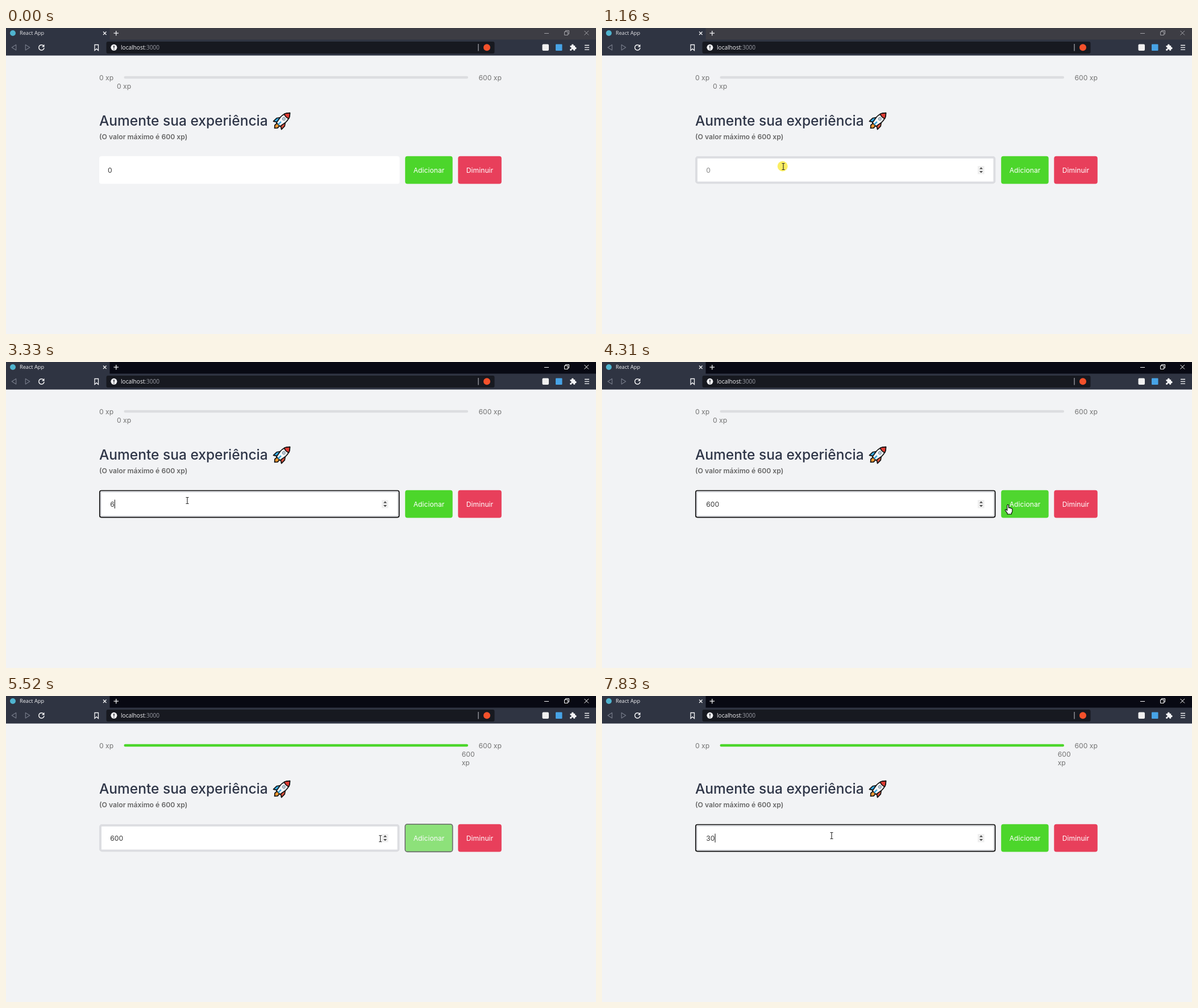
Recreate the animation shown at these times as an HTML page. Size 1038 px wide and 539 px high, loop 8000 ms.

```html
<!DOCTYPE html>
<html lang="pt-BR">
<head>
<meta charset="utf-8">
<title>React App</title>
<style>
  html, body { margin: 0; width: 100%; height: 100%; overflow: hidden; background: #f2f3f5; }
  svg { display: block; width: 100vw; height: 100vh; }
  text { font: 12.2px Inter, sans-serif; white-space: pre; }
  .ui { font-family: "Open Sans", "Noto Sans", sans-serif; }
  .muted { fill: #737373; }
  .line { fill: none; stroke: #f4f4f6; stroke-width: 1.3; }
</style>
</head>
<body>
<svg viewBox="0 0 1038 539">
  <rect width="1038" height="539" fill="#f2f3f5"/>

  <!-- browser frame -->
  <rect id="titleBar" width="1038" height="21"/>
  <path d="M0 0H182.500V20.500H1038V48.500H0Z" fill="#2f3442"/>
  <circle cx="12" cy="9" r="5" fill="#4fb4cf"/>
  <text id="tabTitle" class="ui" x="24" y="12.300" style="font-size:9.2px;font-weight:500">React App</text>
  <path class="line" d="M171 6.500l5.500 5.500m0-5.500l-5.500 5.500"/>
  <path class="line" d="M189.500 9.200h8.500m-4.250-4.250v8.500"/>
  <g id="windowButtons" fill="none" stroke-width="1">
    <path d="M947 9.500h8"/>
    <path d="M982.500 6.500h6v6h-6zM984.500 6.500v-2h6v6h-2"/>
    <path d="M1017.500 5l7.500 7.500m0-7.500l-7.500 7.500"/>
  </g>
  <g fill="none" stroke="#747987" stroke-width="1.200" stroke-linejoin="round">
    <path d="M17.700 29.500v9.500l-7.500-4.750z"/>
    <path d="M34.300 29.500v9.500l7.500-4.750z"/>
  </g>
  <path class="line" stroke-linecap="round" style="stroke-width:1.500" d="M66 31.300A4.700 4.700 0 1 0 67 35.500"/>
  <path d="M67.500 28.800v4.700h-4.700z" fill="#f4f4f6"/>
  <path class="line" d="M156 29.500h6.500v10l-3.250-2.800l-3.250 2.800z"/>
  <rect x="176.500" y="24" width="683" height="21" rx="3" fill="#171920"/>
  <circle cx="189.900" cy="34.300" r="5.500" fill="#f4f4f6"/>
  <path d="M189.900 31v4.200m0 1.200v1.400" stroke="#171920" stroke-width="1.500"/>
  <text class="ui" x="202" y="38" fill="#f4f4f6" style="font-size:10.1px">localhost<tspan fill="#9b9da5">:3000</tspan></text>
  <path d="M831 28v12.500" stroke="#c9cad0"/>
  <circle cx="846" cy="34.200" r="6" fill="#f4512b"/>
  <rect x="943.500" y="28.500" width="11.500" height="11.500" rx="2" fill="#f1f1f1"/>
  <rect x="967" y="28.500" width="11.500" height="11.500" rx="1" fill="#47a3e6"/>
  <path d="M992.500 31h2.500a1.900 1.900 0 1 1 3.600 0h2.500v2.700a1.900 1.900 0 1 1 0 3.600v2.400h-2.800a1.700 1.700 0 1 0-3.200 0h-2.900v-2.900a1.700 1.700 0 1 0 .300-3.200z" fill="#f4f4f6"/>
  <path class="line" d="M1018 30.500h8m-8 3.800h8m-8 3.800h8"/>

  <!-- progress -->
  <text class="muted" x="164" y="91.500">0 xp</text>
  <text class="muted" x="831.500" y="91.500">600 xp</text>
  <rect id="track" x="207.500" y="84.700" width="605.500" height="4.600" rx="2.300"/>
  <text id="emptyLabel" class="muted" x="207.500" y="107" text-anchor="middle">0 xp</text>
  <text id="fullLabel" class="muted" y="107"><tspan x="801.700">600</tspan><tspan x="801.700" dy="15.300">xp</tspan></text>

  <!-- heading -->
  <text x="164" y="171.500" fill="#2e3547" style="font-size:24.5px;font-weight:500">Aumente sua experiência</text>
  <text x="164" y="196" fill="#666" style="font-weight:600">(O valor máximo é 600 xp)</text>
  <g transform="translate(486 163) rotate(45)" stroke="#111" stroke-width="1.700" stroke-linejoin="round">
    <path d="M-3 9L-3.500 15L0 19L3.500 15L3 9Z" fill="#f59b35"/>
    <path d="M-5-3L-10 4V12L-4 8Z" fill="#35a9e1"/>
    <path d="M5-3L10 4V12L4 8Z" fill="#e2533f"/>
    <path d="M0-19C5-14 7-9 6.500-2L4.500 10H-4.500L-6.500-2C-7-9-5-14 0-19Z" fill="#f4f6f8"/>
    <path d="M0-19C3-16 5-13.500 5.800-10.500Q0-8-5.800-10.500C-5-13.500-3-16 0-19Z" fill="#df3c34"/>
    <circle cy="-4" r="2.400" fill="#c3d4df" stroke="#7a8d9b" stroke-width="1"/>
    <path d="M0 3V10" stroke="#35a9e1" stroke-width="2.500"/>
  </g>

  <!-- form -->
  <rect x="164" y="225.700" width="528.500" height="48.700" rx="4" fill="#fff"/>
  <g id="fieldBorder">
    <rect x="166" y="227.700" width="524.500" height="44.700" rx="2.500" fill="none" stroke="#dcdde1" stroke-width="4"/>
    <rect x="661" y="243" width="11.500" height="14.500" fill="#efefef"/>
    <path d="M664 248.500l3-3.300l3 3.300zM664 252l3 3.300l3-3.300z" fill="#484848"/>
  </g>
  <rect id="fieldRing" x="164.800" y="226.500" width="526.900" height="47.100" rx="3" fill="none" stroke="#101010" stroke-width="1.700"/>
  <rect id="selection" x="183.300" y="242" height="16" fill="#2f8ff5"/>
  <text id="value" y="254.500"></text>
  <rect id="caret" y="242.500" width="1" height="15.500" fill="#111"/>
  <g id="addButton">
    <rect x="702.200" y="225.700" width="83.500" height="48.700" rx="4" fill="#4cd62b"/>
    <text x="744" y="254.500" text-anchor="middle" fill="#fff">Adicionar</text>
    <rect id="addRing" x="702.200" y="225.700" width="83.500" height="48.700" rx="4" fill="none" stroke="#101010" stroke-width="1.600"/>
  </g>
  <rect x="795.300" y="225.700" width="76.500" height="48.700" rx="4" fill="#e83f5b"/>
  <text x="833.500" y="254.500" text-anchor="middle" fill="#fff">Diminuir</text>

  <!-- pointer -->
  <g id="pointer">
    <circle id="press" cx="-1.300" cy="-.500" r="9" fill="#fbee62"/>
    <path id="arrow" d="M0 0V16L3.700 12.600L6.100 18.300L8.500 17.300L6.100 11.700H11.300Z" fill="#fff" stroke="#000" stroke-width=".9"/>
    <path id="beam" d="M-2.500-5.500H-.700L0-5L.700-5.500H2.500M0-5V5M-2.500 5.500H-.700L0 5L.700 5.500H2.500" fill="none" stroke="#222" stroke-width="1.100"/>
    <path id="hand" d="M-1.300 1.200Q0-.700 1.300 1.200V6Q2.800 4.900 3.800 6.400Q5.200 5.500 6 7Q7.700 6.500 7.700 8.300V12Q7.500 14 6.200 15V17H-1V15.300L-4.700 10.500Q-5.200 8.700-3.500 8.700L-1.300 10.500Z" fill="#fff" stroke="#000" stroke-width="1.100" stroke-linejoin="round"/>
  </g>
</svg>
<script>
const LOOP = 8000;
const ui = Object.fromEntries([...document.querySelectorAll("[id]")].map(el => [el.id, el]));

const smooth = u => u * u * (3 - 2 * u);
const linear = u => u;
const easeOut = u => 1 - (1 - u) ** 2;
const clamp = u => Math.max(0, Math.min(1, u));
const within = (t, ranges) => ranges.some(([a, b]) => t >= a && t < b);
const show = (el, on) => el.setAttribute("visibility", on ? "visible" : "hidden");
const set = (el, attrs) => { for (const k in attrs) el.setAttribute(k, attrs[k]); };

// time, x, y, easing towards this point
const path = [
  [320, 845, 510],
  [1110, 319, 244, smooth],
  [3980, 319, 244, linear],
  [4080, 410, 221, linear],
  [4180, 548, 208, linear],
  [4260, 655, 224, linear],
  [4310, 714, 251, linear],
  [4670, 744, 253, easeOut],
  [5370, 744, 253, linear],
  [5830, 406, 246, smooth]
];
const presses = [[1160, 1330], [1760, 1860], [4900, 4990], [6060, 6160], [6490, 6520]];
const selections = [[1790, 3330], [6490, 7730]];
const values = [[0, "0"], [3330, "6"], [3430, "60"], [3710, "600"], [7730, "3"], [7830, "30"]];
const carets = [[1220, 1790], [3330, 4210], [4790, 4900], [6060, 6490], [7730, LOOP]];
const fieldFocus = [[1220, 4900], [6060, LOOP]];

function pointerAt(t) {
  if (t >= 6720) return [404, 246];
  const i = path.findIndex(p => p[0] > t);
  if (i < 0) return path.at(-1).slice(1, 3);
  if (i === 0) return [-50, -50];
  const [t0, x0, y0] = path[i - 1], [t1, x1, y1, ease] = path[i];
  const u = ease((t - t0) / (t1 - t0));
  return [x0 + (x1 - x0) * u, y0 + (y1 - y0) * u];
}

function render(t) {
  const [x, y] = pointerAt(t);
  const inRow = y > 225.7 && y < 274.4;
  const overField = inRow && x > 164 && x < 692.5;
  const overAdd = inRow && x > 702.2 && x < 785.7;
  const focused = within(t, fieldFocus);
  const selected = within(t, selections);
  const bordered = focused || overField;
  const full = t >= 5000;
  const active = t >= 1220;

  set(ui.titleBar, { fill: active ? "#080913" : "#3d3d44" });
  set(ui.tabTitle, { fill: active ? "#f4f4f6" : "#e4e4e8" });
  set(ui.windowButtons, { stroke: active ? "#fff" : "#a3a3a8" });

  set(ui.track, { fill: full ? "#4cd62b" : "#dcdde0" });
  show(ui.emptyLabel, !full);
  show(ui.fullLabel, full);

  const textX = bordered ? 183.3 : 179;
  ui.value.textContent = values.findLast(v => v[0] <= t)[1];
  set(ui.value, { x: textX, fill: selected ? "#fff" : overField && !active ? "#858585" : "#383838" });
  const width = ui.value.getComputedTextLength();
  show(ui.fieldBorder, bordered);
  show(ui.fieldRing, focused);
  show(ui.selection, selected);
  set(ui.selection, { width });
  show(ui.caret, within(t, carets));
  set(ui.caret, { x: textX + width });

  const hover = clamp((t - 4300) / 250) - clamp((t - 5470) / 250);
  set(ui.addButton, { opacity: 1 - hover / 2 });
  show(ui.addRing, t >= 4900 && t < 6060);

  set(ui.pointer, { transform: `translate(${x} ${y})` });
  show(ui.press, within(t, presses));
  show(ui.beam, overField);
  show(ui.hand, overAdd);
  show(ui.arrow, !overField && !overAdd);
}

const start = performance.now();
function tick() {
  render((performance.now() - start) % LOOP);
  requestAnimationFrame(tick);
}
tick();
</script>
</body>
</html>
```
